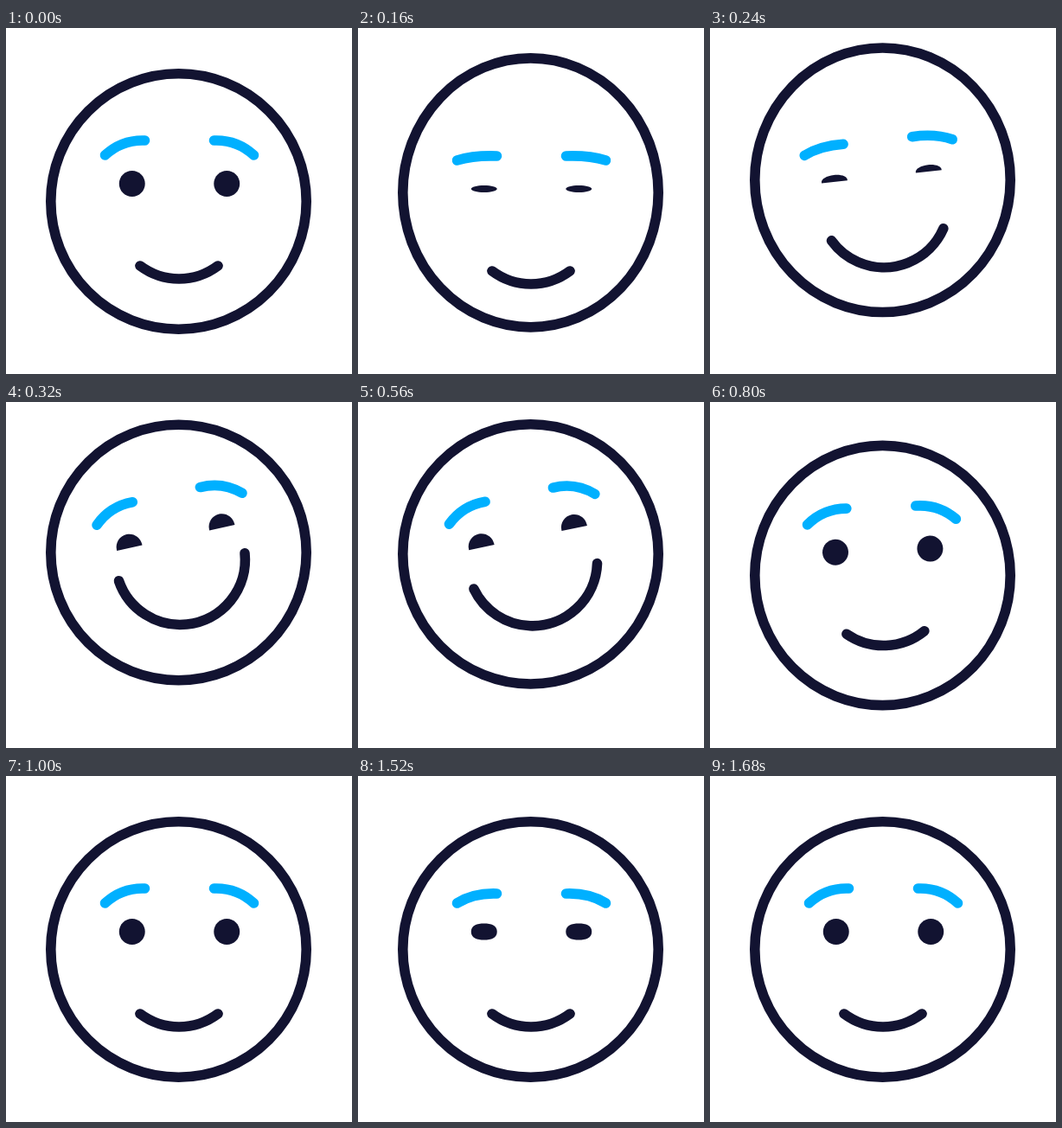
An HTML page with a canvas for the animation above (2.56 s loop, 400x400 px).

```html
<!DOCTYPE html>
<html lang="en">
<head>
<meta charset="utf-8">
<title>Laughing face</title>
<style>
  html, body { margin: 0; width: 100%; height: 100%; overflow: hidden; background: #fff; }
  canvas { display: block; width: 100vmin; height: 100vmin; }
</style>
</head>
<body>
<canvas id="stage"></canvas>
<script>
const LOOP = 2560, STEP = 40, SIZE = 400;
const NAVY = '#121331', BLUE = '#00b0ff';
const FACE_RADIUS = 147.7, EYE_RADIUS = 15;

const canvas = document.getElementById('stage');
const ctx = canvas.getContext('2d');
const density = window.devicePixelRatio || 1;
canvas.width = canvas.height = SIZE * density;

const progress = (t, from, to) => Math.min(1, Math.max(0, (t - from) / (to - from)));

function ease(t, from, to) {
  const u = progress(t, from, to);
  return u * u * (3 - 2 * u);
}

// Rises from 0 to 1, holds, then falls back to 0.
const swell = (t, riseStart, riseEnd, fallStart, fallEnd) =>
  ease(t, riseStart, riseEnd) - ease(t, fallStart, fallEnd);

const hump = (t, from, to) => Math.sin(Math.PI * progress(t, from, to));

function poseAt(t) {
  const blink = swell(t, 1480, 1560, 1600, 1680);
  return {
    blink,
    lid: blink + swell(t, 60, 160, 200, 320) + swell(t, 560, 640, 640, 715),
    laughing: t >= 200 && t < 640,
    smile: swell(t, 160, 320, 520, 680),
    faceY: -26.5 * swell(t, 80, 270, 520, 766),
    stretch: 1 + 0.053 * (hump(t, 0, 310) + hump(t, 530, 830)),
    featureY: 6 * swell(t, 0, 160, 160, 320) - 24.5 * swell(t, 160, 320, 540, 970),
    tilt: -12.4 * swell(t, 160, 320, 500, 910)
  };
}

function stroke(color) {
  ctx.strokeStyle = color;
  ctx.stroke();
}

function drawEye(x, { lid, blink, laughing }) {
  const y = -20.5, rx = EYE_RADIUS, ry = EYE_RADIUS - 11 * lid;
  const flat = rx * 0.552, side = ry * (0.552 + 0.8 * blink * (1 - blink));
  ctx.beginPath();
  ctx.moveTo(x - rx, y);
  ctx.bezierCurveTo(x - rx, y - side, x - flat, y - ry, x, y - ry);
  ctx.bezierCurveTo(x + flat, y - ry, x + rx, y - side, x + rx, y);
  if (laughing) {
    ctx.lineTo(x + rx, y + 1);
    ctx.lineTo(x - rx, y + 1);
  } else {
    ctx.bezierCurveTo(x + rx, y + side, x + flat, y + ry, x, y + ry);
    ctx.bezierCurveTo(x - flat, y + ry, x - rx, y + side, x - rx, y);
  }
  ctx.closePath();
  ctx.fillStyle = NAVY;
  ctx.fill();
}

function drawBrow(side, { lid }) {
  const drop = 12 * lid;
  ctx.beginPath();
  ctx.moveTo(side * 86, -53.5);
  ctx.quadraticCurveTo(side * 66.5, -71.5 + drop, side * 40, -70.5 + drop);
  stroke(BLUE);
}

function drawMouth({ smile }) {
  const half = (36.9 + 46.6 * smile) * Math.PI / 180;
  ctx.beginPath();
  ctx.arc(-0.5, 14.5 - 8 * smile, 75, Math.PI / 2 - half, Math.PI / 2 + half);
  stroke(NAVY);
}

function draw(t) {
  const pose = poseAt(t);

  ctx.setTransform(density, 0, 0, density, 0, 0);
  ctx.fillStyle = '#fff';
  ctx.fillRect(0, 0, SIZE, SIZE);
  ctx.lineWidth = 11.6;
  ctx.lineCap = 'round';

  ctx.beginPath();
  ctx.ellipse(199.5, 200.5 + pose.faceY, FACE_RADIUS, FACE_RADIUS * pose.stretch, 0, 0, Math.PI * 2);
  stroke(NAVY);

  ctx.translate(200.5, 200.5 + pose.featureY);
  ctx.rotate(pose.tilt * Math.PI / 180);
  for (const side of [-1, 1]) {
    drawEye(side * 54.75, pose);
    drawBrow(side, pose);
  }
  drawMouth(pose);
}

const start = performance.now();
function tick() {
  const t = (performance.now() - start) % LOOP;
  draw(Math.floor(t / STEP) * STEP);
  requestAnimationFrame(tick);
}
tick();
</script>
</body>
</html>
```
